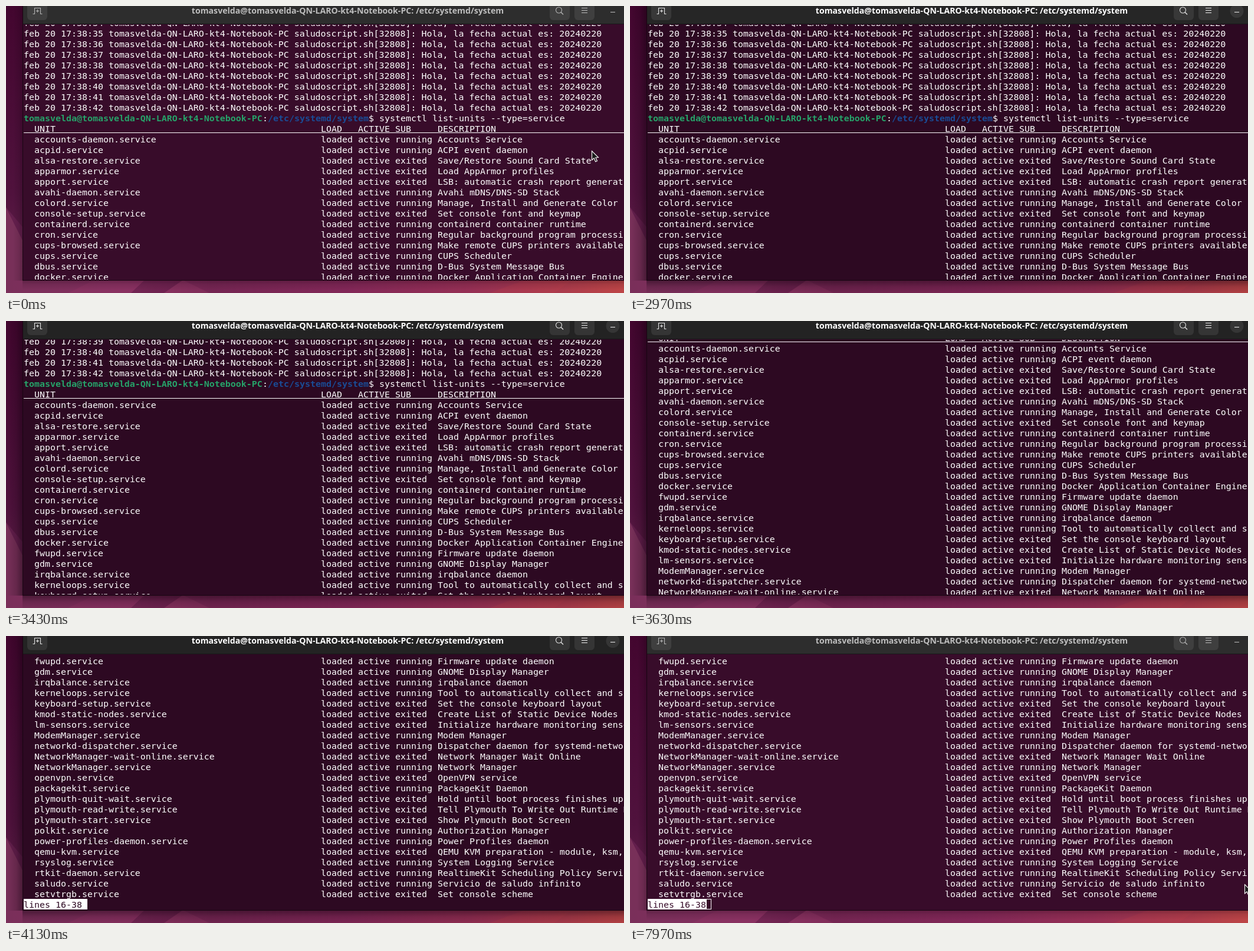
Write an HTML page with a canvas that moves like this. It is 1048 by 488 pixels and loops after 8 s.

```html
<!DOCTYPE html>
<html lang="es">
<head>
<meta charset="utf-8">
<title>Terminal</title>
<style>
html, body { margin: 0; width: 100%; height: 100%; overflow: hidden; background: #2c0520; }
canvas { display: block; }
</style>
</head>
<body>
<canvas id="stage" width="1048" height="488"></canvas>
<script>
const ctx = document.getElementById('stage').getContext('2d');
const W = 1048, H = 488, LOOP = 8000, STEP = 100 / 3;
const LEFT = 30, CELL = 9, ROW = 18, TOP = 19, BASE = 15;
const MONO = '14.95px "DejaVu Sans Mono", monospace';
const USER = 'tomasvelda', HOST = USER + '-QN-LARO-kt4-Notebook-PC', DIR = '/etc/systemd/system';
const FOCUS_IN = 2965, FOCUS_OUT = 6225;

// unit | r = running, e = exited | description
const SERVICES = `accounts-daemon|r|Accounts Service
acpid|r|ACPI event daemon
alsa-restore|e|Save/Restore Sound Card State
apparmor|e|Load AppArmor profiles
apport|e|LSB: automatic crash report generation
avahi-daemon|r|Avahi mDNS/DNS-SD Stack
colord|r|Manage, Install and Generate Color Profiles
console-setup|e|Set console font and keymap
containerd|r|containerd container runtime
cron|r|Regular background program processing daemon
cups-browsed|r|Make remote CUPS printers available locally
cups|r|CUPS Scheduler
dbus|r|D-Bus System Message Bus
docker|r|Docker Application Container Engine
fwupd|r|Firmware update daemon
gdm|r|GNOME Display Manager
irqbalance|r|irqbalance daemon
kerneloops|r|Tool to automatically collect and submit
keyboard-setup|e|Set the console keyboard layout
kmod-static-nodes|e|Create List of Static Device Nodes
lm-sensors|e|Initialize hardware monitoring sensors
ModemManager|r|Modem Manager
networkd-dispatcher|r|Dispatcher daemon for systemd-networkd
NetworkManager-wait-online|e|Network Manager Wait Online
NetworkManager|r|Network Manager
openvpn|e|OpenVPN service
packagekit|r|PackageKit Daemon
plymouth-quit-wait|e|Hold until boot process finishes up
plymouth-read-write|e|Tell Plymouth To Write Out Runtime Data
plymouth-start|e|Show Plymouth Boot Screen
polkit|r|Authorization Manager
power-profiles-daemon|r|Power Profiles daemon
qemu-kvm|e|QEMU KVM preparation - module, ksm, hugepages
rsyslog|r|System Logging Service
rtkit-daemon|r|RealtimeKit Scheduling Policy Service
saludo|r|Servicio de saludo infinito
setvtrgb|e|Set console scheme`.split('\n').map(s => s.split('|'));

// Each row is a list of [column, text, colour, bold]
const columns = (unit, load, active, sub, text) =>
  [[2, unit], [56, load], [63, active], [70, sub], [78, text]];
const rows = [];
for (let s = 34; s <= 42; s++)
  rows.push([[0, `feb 20 17:38:${s} ${HOST} saludoscript.sh[32808]: Hola, la fecha actual es: 20240220`]]);
rows.push([
  [0, USER + '@' + HOST, '#26a269', true], [45, ':'],
  [46, DIR, '#1a4c96', true], [65, '$ systemctl list-units --type=service']
]);
const HEADER = rows.length;
rows.push(columns('UNIT', 'LOAD', 'ACTIVE', 'SUB', 'DESCRIPTION'));
for (const [name, sub, text] of SERVICES)
  rows.push(columns(name + '.service', 'loaded', 'active', sub === 'r' ? 'running' : 'exited', text));
const STATUS = rows.length;

const clamp = v => Math.max(0, Math.min(1, v));
const easeOut = v => 1 - (1 - clamp(v)) ** 3;

// Linear path through [time, ...values]; null outside of it
function follow(keys, t) {
  for (let i = 1; i < keys.length; i++) {
    const a = keys[i - 1], b = keys[i];
    if (t >= a[0] && t < b[0]) {
      const k = (t - a[0]) / (b[0] - a[0]);
      return a.slice(1).map((v, j) => v + (b[j + 1] - v) * k);
    }
  }
  return null;
}

const SCROLL = [[3170, 0], [3433, 84], [3833, 264], [4133, 436]];
const POINTER = [
  [[0, 993, 246], [100, 1028, 239], [430, 1028, 239], [580, 996, 228], [690, 993, 210], [870, 1049, 192]],
  [[5395, 1048, 412], [5480, 1036, 420], [5600, 1049, 434]],
  [[7960, 1042, 422], [8100, 1042, 422]]
];

function scrollAt(t) {
  if (t < 3170) return 0;
  const p = follow(SCROLL, t);
  return p ? Math.round(p[0] / 12) * 12 : 436;
}

function rect(x, y, w, h, color) {
  ctx.fillStyle = color;
  ctx.fillRect(x, y, w, h);
}

function poly(points, color) {
  ctx.beginPath();
  points.forEach(([x, y]) => ctx.lineTo(x, y));
  ctx.closePath();
  ctx.fillStyle = color;
  ctx.fill();
}

function gradient(x0, y0, x1, y1, stops) {
  const g = ctx.createLinearGradient(x0, y0, x1, y1);
  stops.forEach(([p, c]) => g.addColorStop(p, c));
  return g;
}

function stroke(points, color, width = 1.1) {
  ctx.beginPath();
  points.forEach(([x, y]) => ctx.lineTo(x, y));
  ctx.strokeStyle = color;
  ctx.lineWidth = width;
  ctx.stroke();
}

function wallpaper() {
  rect(0, 0, 30, H, gradient(0, 0, 0, H, [[0, '#43062f'], [0.65, '#50123d'], [1, '#66264e']]));
  poly([[0, 342], [30, 402], [30, 488], [0, 488]], '#783059');
  poly([[0, 342], [30, 378], [30, 402]], '#641f4d');
  rect(0, 466, W, 22, gradient(0, 0, W, 0, [
    [0, '#7a2f5a'], [0.2, '#842f5f'], [0.33, '#742552'], [0.55, '#812757'],
    [0.75, '#952f54'], [0.9, '#ab3b4c'], [1, '#bd4546']
  ]));
  poly([[105, 488], [150, 466], [235, 466], [212, 488]], 'rgba(150,55,105,.3)');
  poly([[235, 466], [300, 466], [268, 488], [212, 488]], 'rgba(65,10,50,.25)');
  poly([[300, 466], [345, 488], [268, 488]], 'rgba(160,65,110,.25)');
  poly([[820, 488], [880, 466], [960, 466], [930, 488]], 'rgba(190,65,75,.22)');
}

function shadow(focused) {
  const reach = focused ? 26 : 16, dark = focused ? 0.45 : 0.26;
  const stops = [[0, `rgba(15,0,12,${dark})`], [0.4, `rgba(15,0,12,${dark * 0.4})`], [1, 'rgba(15,0,12,0)']];
  rect(28 - reach, 0, reach, 467, gradient(28, 0, 28 - reach, 0, stops));
  rect(28, 467, W, 21, gradient(0, 467, 0, 467 + reach, stops));
}

function button(x, w, color) {
  ctx.beginPath();
  ctx.roundRect(x, -9, w, 33, 6);
  ctx.fillStyle = color;
  ctx.fill();
}

function titleBar(focused, level) {
  const shade = Math.round(45 - 10 * level), face = `rgb(${shade + 18},${shade + 18},${shade + 18})`;
  const ink = focused ? '#e4e4e4' : '#b4b4b4';
  rect(29, 0, W, 31, `rgb(${shade},${shade},${shade})`);
  rect(29, 30, W, 1, '#191919');
  button(36, 34, face);
  button(922, 34, face);
  button(964, 34, face);

  stroke([[45.5, 13.5], [48.5, 13.5], [48.5, 3.5], [58.5, 3.5], [58.5, 13.5], [61.5, 13.5]], ink);
  stroke([[51, 8.5], [56, 8.5]], ink);
  stroke([[53.5, 6], [53.5, 11]], ink);

  ctx.beginPath();
  ctx.arc(937.5, 7, 5, 0, 7);
  ctx.stroke();
  stroke([[941, 10.5], [945, 14.5]], ink, 1.4);
  for (const y of [3.5, 7.5, 11.5]) stroke([[976, y], [986, y]], ink);

  if (focused) {
    ctx.beginPath();
    ctx.arc(1029, 8.5, 11.5, 0, 7);
    ctx.fillStyle = face;
    ctx.fill();
  }
  stroke([[1025, 10.5], [1033, 10.5]], ink);

  ctx.font = 'bold 14.15px "Noto Sans", "Open Sans", sans-serif';
  ctx.textAlign = 'center';
  ctx.fillStyle = focused ? '#ffffff' : '#bdbdbd';
  ctx.fillText(`${USER}@${HOST}: ${DIR}`, 579.5, 13);
  ctx.textAlign = 'left';
}

function statusLine(y, bg, focused, t) {
  rect(LEFT, y, 11 * CELL, ROW, '#fff');
  ctx.fillStyle = bg;
  ctx.font = MONO;
  ctx.fillText('lines 16-38', LEFT, y + BASE);
  const x = LEFT + 11 * CELL;
  if (!focused) {
    ctx.strokeStyle = '#fff';
    ctx.lineWidth = 1;
    ctx.strokeRect(x + 0.5, y + 0.5, CELL - 1, ROW - 1);
  } else if (t < 4765 || t >= 5365 && t < 5965) {
    rect(x, y, CELL, ROW, '#fff');
  }
}

function terminal(t, focused) {
  const bg = focused ? '#2d0922' : '#380c2a';
  const shift = TOP - scrollAt(t);
  rect(28, 0, W, 467, '#180612');
  rect(29, 31, W, 435, bg);
  ctx.save();
  ctx.beginPath();
  ctx.rect(29, 32, W, 433);
  ctx.clip();
  rows.forEach((row, i) => {
    const y = shift + i * ROW;
    // Rows ending at the top edge are fully scrolled out
    if (y <= TOP - 4 || y > 470) return;
    for (const [col, text, color, bold] of row) {
      ctx.font = (bold ? 'bold ' : '') + MONO;
      ctx.fillStyle = color || '#fff';
      ctx.fillText(text, LEFT + col * CELL, y + BASE);
    }
    if (i === HEADER) rect(LEFT, y + 16, W, 1, '#fff');
  });
  statusLine(shift + STATUS * ROW, bg, focused, t);
  ctx.restore();
}

function pointer(t) {
  const at = POINTER.map(keys => follow(keys, t)).find(Boolean);
  if (!at) return;
  ctx.save();
  ctx.translate(Math.round(at[0]) + 0.5, Math.round(at[1]) + 0.5);
  poly([[0, 0], [0, 15.5], [3.6, 12.2], [6.2, 18.2], [9, 17], [6.4, 11.2], [11, 11]], '#1c1c1c');
  ctx.strokeStyle = '#fff';
  ctx.lineWidth = 1.1;
  ctx.stroke();
  ctx.restore();
}

function draw(t) {
  const focused = t >= FOCUS_IN && t < FOCUS_OUT;
  const level = t < FOCUS_OUT ? easeOut((t - FOCUS_IN + 100) / 300) : 1 - easeOut((t - FOCUS_OUT) / 400);
  wallpaper();
  shadow(focused);
  terminal(t, focused);
  titleBar(focused, level);
  pointer(t);
}

const start = performance.now();
function tick() {
  const t = (performance.now() - start) % LOOP;
  draw(Math.floor((t + 4) / STEP) * STEP);
  requestAnimationFrame(tick);
}
tick();
</script>
</body>
</html>
```
